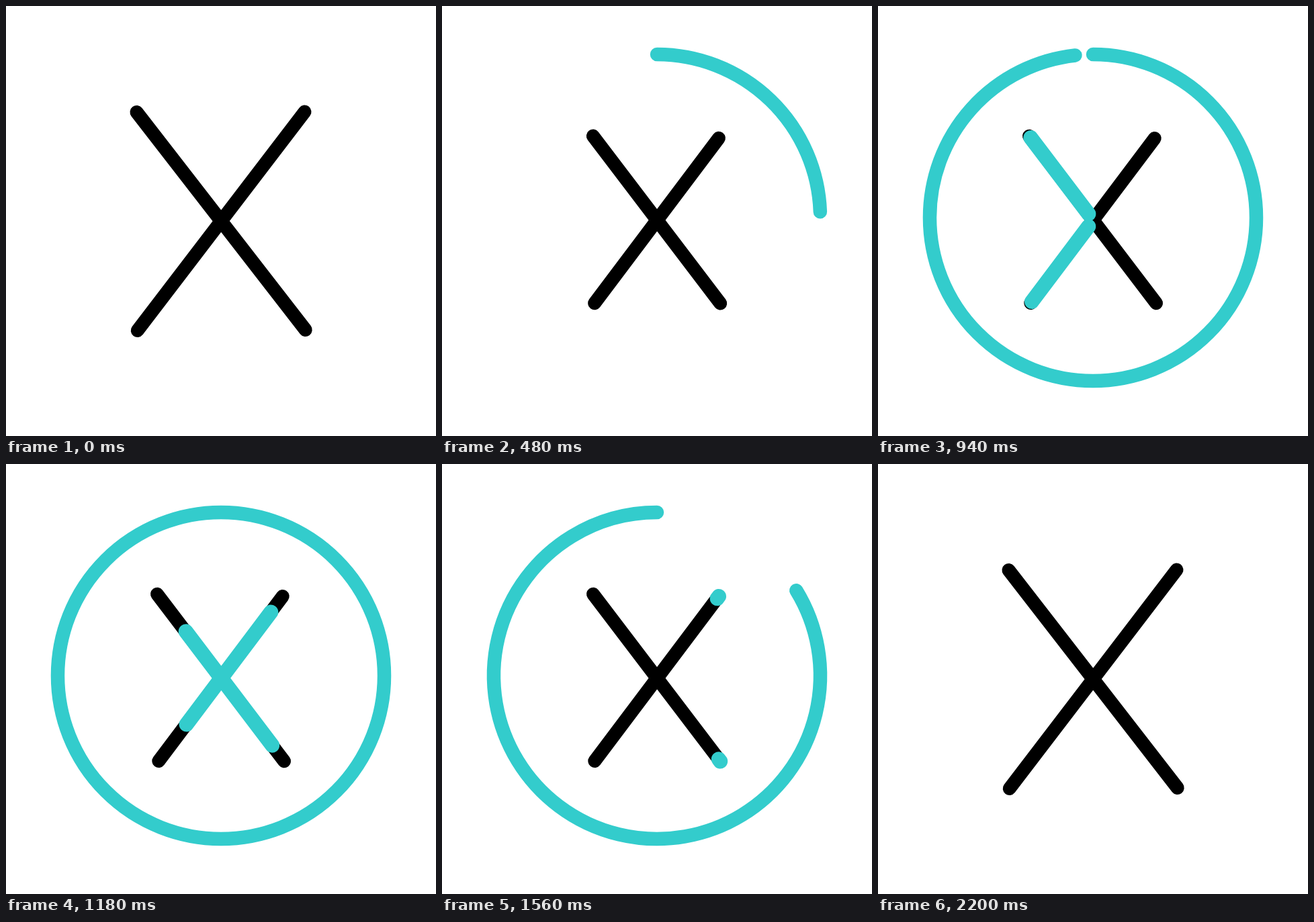
An HTML page with a canvas that plays this animation: 640 px wide and 640 px high, repeating every 2600 ms.

```html
<!DOCTYPE html>
<html lang="en">
<head>
<meta charset="utf-8">
<title>Cross and ring</title>
<style>
  html, body { margin: 0; width: 100%; height: 100%; overflow: hidden; background: #fff; }
  canvas { display: block; width: 640px; height: 640px; }
</style>
</head>
<body>
<canvas id="stage" width="640" height="640"></canvas>
<script>
const ctx = document.getElementById('stage').getContext('2d');
const LOOP = 2600, STEP = 20;
const BLACK = '#000', TEAL = '#33cccc';
const RING = { x: 320, y: 315, r: 243 };

// Each bar: [x1, y1, x2, y2]
const BARS = [
  { wide: [194.5, 158, 445.7, 482], small: [225, 193.7, 414, 442.3], glow: [227.3, 196, 414.2, 442.5] },
  { wide: [195.7, 483, 444.5, 157.5], small: [227.3, 442, 411.7, 197], glow: [229, 440, 412, 197] }
];

const lerp = (a, b, k) => a + (b - a) * k;

function ease(t, from, to) {
  const s = Math.min(1, Math.max(0, (t - from) / (to - from)));
  return s * s * (3 - 2 * s);
}

function stroke(color, width) {
  ctx.strokeStyle = color;
  ctx.lineWidth = width;
  ctx.stroke();
}

// Strokes the part of a bar between fractions a and b
function bar([x1, y1, x2, y2], a, b, color, width) {
  if (b <= a) return;
  ctx.beginPath();
  ctx.moveTo(lerp(x1, x2, a), lerp(y1, y2, a));
  ctx.lineTo(lerp(x1, x2, b), lerp(y1, y2, b));
  stroke(color, width);
}

function ring(a, b) {
  if (b <= a) return;
  const turn = k => (k - 0.25) * Math.PI * 2;
  ctx.beginPath();
  ctx.arc(RING.x, RING.y, RING.r, turn(a), turn(b));
  stroke(TEAL, 20.5);
}

function draw(t) {
  ctx.fillStyle = '#fff';
  ctx.fillRect(0, 0, 640, 640);
  ctx.lineCap = 'round';

  const shrink = ease(t, 67, 500) - ease(t, 1767, 2200);
  for (const { wide, small } of BARS) {
    bar(wide.map((v, i) => lerp(v, small[i], shrink)), 0, 1, BLACK, 20);
  }

  const tail = ease(t, 1000, 1600), head = ease(t, 600, 1318);
  for (const { glow } of BARS) bar(glow, tail, head, TEAL, 22);

  ring(ease(t, 1389, 2058), ease(t, 233, 1000));
}

const start = performance.now();

function tick() {
  const t = (performance.now() - start) % LOOP;
  draw(Math.floor(t / STEP) * STEP);
  requestAnimationFrame(tick);
}
tick();
</script>
</body>
</html>
```
